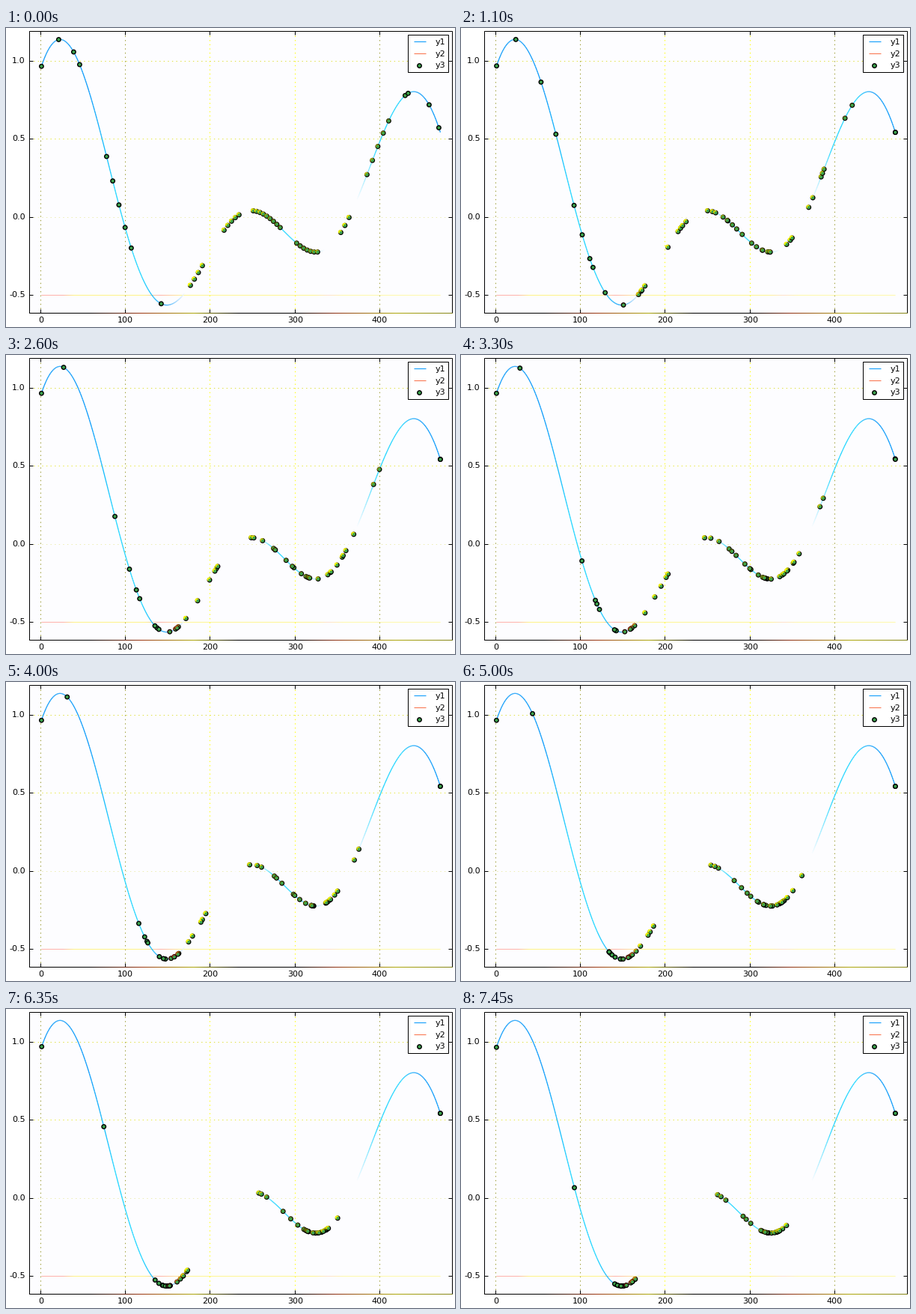
A matplotlib script that plays this animation: 600x400 px, repeating every 7500 ms.

```python
import matplotlib.pyplot as plt
import numpy as np
from matplotlib.animation import FuncAnimation
from matplotlib.collections import LineCollection
from matplotlib.colors import to_rgba_array
from matplotlib.patches import Rectangle

W, H, DPI = 600, 400, 100
FRAMES, INTERVAL = 150, 50
PX = 72 / DPI
X0, X1, Y0, Y1 = 31, 596, 4, 381
LO, HI = 47, 580
BLUE, CYAN, GREEN, PLOT_BG = "#0096fa", "#14d4ff", "#3da44d", "#fdfdff"
YELLOW, OLIVE, SALMON = "#ffff00", "#9a9a30", "#ff9a90"

plt.rcParams.update({"font.family": "DejaVu Sans", "font.size": 8})

# Smooth curve through a few stage positions
KEYS = np.array([
    (47, 50), (51, 41), (73, 14.5), (98, 48.5), (134, 172), (165, 287.5),
    (190, 349.5), (215, 370), (246, 345), (279, 288), (305, 254), (330, 243.5),
    (366, 267), (388, 288), (416, 299), (447, 272.5), (482, 196), (508, 131),
    (543, 84), (565, 103), (580, 139)])
curve = np.polynomial.Chebyshev.fit(*KEYS.T, 11)
slope = curve.deriv()

# Walkers start in loose groups: first x, last x, count
GROUPS = [(47, 70, 2), (90, 98, 2), (134, 167, 5), (207, 207, 1),
          (246, 262, 4), (291, 311, 5), (330, 366, 9), (388, 416, 7),
          (447, 458, 3), (482, 511, 5), (533, 537, 2), (565, 578, 2)]


def walk():
    """Noisy downhill steps, with the speed levelling off on steep slopes."""
    rng = np.random.default_rng(4)
    x = np.concatenate([np.linspace(*g) for g in GROUPS])
    path = [x]
    for _ in range(FRAMES - 1):
        s = slope(x)
        drift = 1.3 * s * np.abs(s) / (s * s + 3)
        x = np.clip(x + drift + rng.normal(0, 0.9, x.size), LO, HI)
        path.append(x)
    return path


def ramp(x, stops):
    """Blend colours along x; stops are (position, colour) pairs."""
    pos, colors = zip(*stops)
    rgba = to_rgba_array(colors)
    return np.column_stack([np.interp(x, pos, rgba[:, k]) for k in range(4)])


def gradient_line(x, y, stops, width, z):
    pts = np.column_stack([x, y])
    segs = np.stack([pts[:-1], pts[1:]], axis=1)
    ax.add_collection(LineCollection(segs, colors=ramp(x[:-1], stops),
                                     linewidths=width * PX, zorder=z))


def line(xs, ys, color="k", z=4, **kw):
    ax.plot(xs, ys, color=color, lw=PX, zorder=z,
            solid_capstyle="butt", dash_capstyle="butt", **kw)


def grid(xs, ys, color):
    line(xs, ys, color, z=1, linestyle=(0, (1.4, 4.2)))


def box(x0, y0, x1, y1, fill, edge, z):
    ax.add_patch(Rectangle((x0, y0), x1 - x0, y1 - y0, fc=fill, ec=edge,
                           lw=PX, zorder=z))


fig = plt.figure(figsize=(W / DPI, H / DPI), dpi=DPI, facecolor="white")
ax = fig.add_axes([0, 0, 1, 1])
# Whole numbers land just inside their pixel, so lines snap to it
ax.set_xlim(-0.4, W - 0.4)
ax.set_ylim(H - 0.4, -0.4)
ax.axis("off")

# Frame, grid, ticks and labels
box(X0, Y0, X1, Y1, PLOT_BG, "none", 0)
box(X0, Y0, X1, Y1, "none", "k", 5)
for i, color in enumerate([OLIVE, OLIVE, YELLOW, YELLOW, OLIVE]):
    x = round(46 + 113.25 * i)
    grid([x, x], [Y1, Y0], color)
    line([x, x], [Y1, Y1 - 5])
    line([x, x], [Y0, Y0 + 5])
    ax.text(x, 394, str(100 * i), ha="center", va="baseline")
for i, color in enumerate(["#e0e040", "#e8e840", "#ececb0", "none"]):
    y = round(44 + 104.4 * i)
    grid([X0, X1], [y, y], color)
    line([X0, X0 + 5], [y, y])
    line([X1, X1 - 5], [y, y])
    ax.text(25.5, y + 3, f"{1 - i / 2:.1f}", ha="right", va="baseline")

# Tinted lower edge, level line and main curve
edge = np.arange(X0, X1 + 1)
gradient_line(edge, np.full(edge.size, Y1), [
    (31, "k"), (110, "k"), (180, "#d04818"), (250, "#e8e010"), (310, "k"),
    (390, "k"), (440, "#c04018"), (520, "#e8e010"), (596, "#b0b020")], 1, 6)
xs = np.linspace(LO, HI, 534)
gradient_line(xs, np.full(xs.size, 357), [
    (47, SALMON), (75, SALMON), (90, "#fff060"), (185, "#fff060"),
    (205, SALMON), (235, "#fff470"), (410, "#fff470"), (430, "#ffd8c0"),
    (450, "#fff890"), (580, "#fff890")], 1, 2)
gradient_line(xs, curve(xs), [
    (47, BLUE), (110, BLUE), (145, CYAN), (180, CYAN), (212, BLUE),
    (238, PLOT_BG), (335, PLOT_BG), (356, CYAN), (390, CYAN),
    (425, PLOT_BG), (468, PLOT_BG), (496, CYAN), (528, CYAN),
    (548, BLUE), (580, BLUE)], 1.25, 2.5)

# Legend
box(537, 9, 591, 59, "white", "k", 10)
line([545, 561], [18, 18], BLUE, z=11)
line([545, 561], [34, 34], "#f87048", z=11)
ax.plot([552], [50], "o", ms=5.5 * PX, mfc=GREEN, mec="k", mew=1.4 * PX, zorder=11)
for i in range(3):
    ax.text(573, 22 + 15.5 * i, f"y{i + 1}", va="baseline", zorder=11)

# Each marker is a black disc, a light rim and a green core, stacked in turn
RIM = [(212, "#ff400000"), (224, "#ff402090"), (240, "#ffff00ff"),
       (338, "#ffff00e0"), (360, "#ffff0060"), (395, "#ffff0060"),
       (436, "#ffff00ff"), (470, "#ffff00e0"), (542, "#ffff0000")]
path = walk()
count = path[0].size
dots = ax.scatter(np.zeros(3 * count), np.zeros(3 * count), linewidths=0,
                  s=np.tile((np.array([6.9, 5.2, 4.0]) * PX) ** 2, count), zorder=7)
colors = np.tile(to_rgba_array(["k", YELLOW, GREEN]), (count, 1))


def update(i):
    x = path[i]
    tint = ramp(x, RIM)
    lift = tint[:, 3:] * [-0.8, 0.0, 0.0] + [0, 0, 0]
    lift[:, 0], lift[:, 1], lift[:, 2] = 0, -0.9 * tint[:, 3], 0.2 * tint[:, 3]
    at = np.stack([x[:, None] + lift, curve(x)[:, None] + lift], axis=2)
    colors[1::3] = tint
    dots.set_offsets(at.reshape(-1, 2))
    dots.set_facecolors(colors)
    return dots,


anim = FuncAnimation(fig, update, frames=FRAMES, interval=INTERVAL,
                     repeat=True, repeat_delay=0, blit=False)
plt.show()
```
